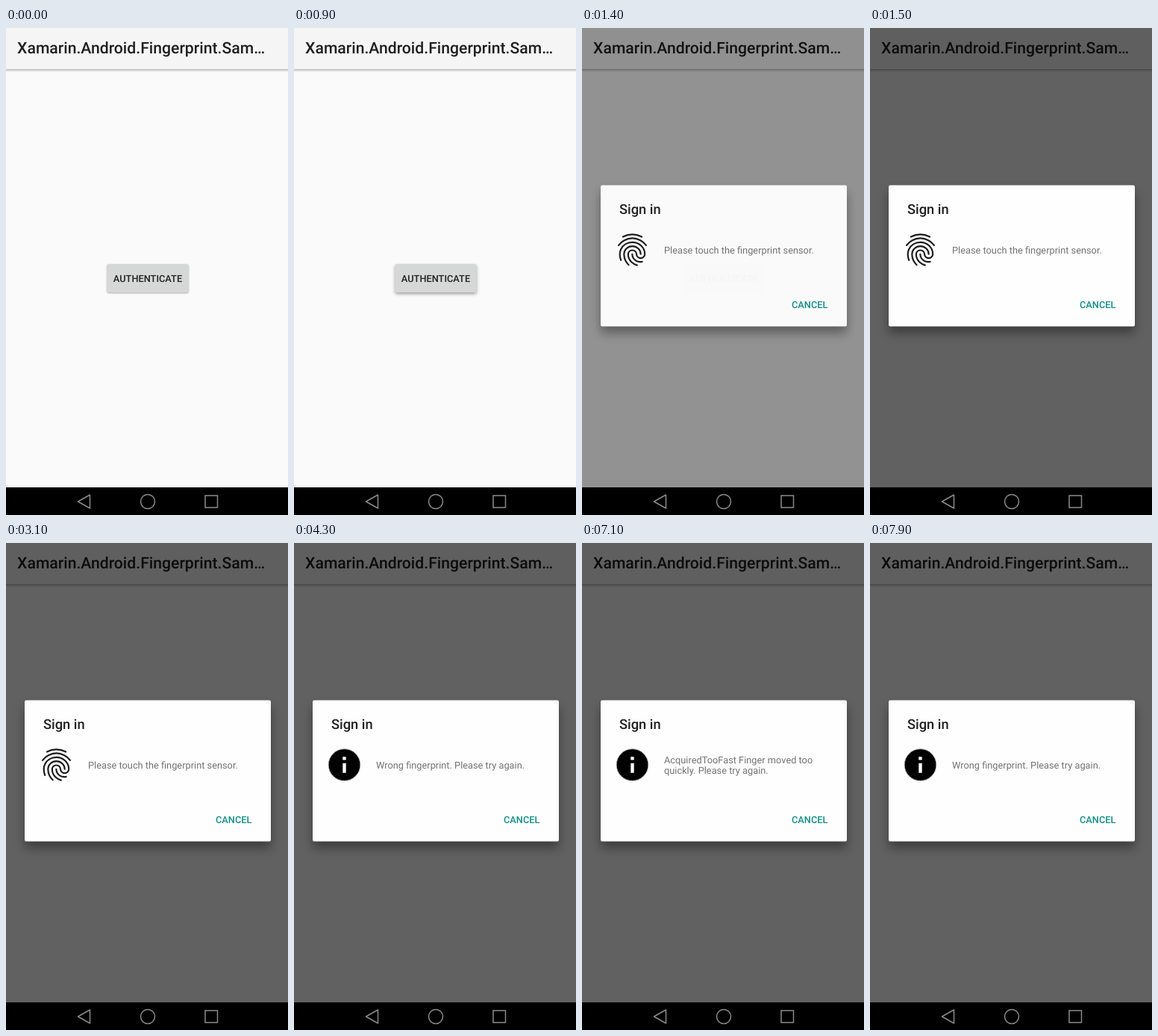
Animation of 378x652 px, one loop 8000 ms. Source, as an HTML page:

```html
<!DOCTYPE html>
<html lang="en">
<head>
<meta charset="utf-8">
<title>Fingerprint sign-in</title>
<style>
  html, body { margin: 0; width: 100%; height: 100%; overflow: hidden; background: #fafafa; }
  svg { display: block; width: 100%; height: 100%; }
  text { font-family: Roboto, "Open Sans", sans-serif; font-size: 12.8px; text-rendering: geometricPrecision; }
  .medium { font-weight: 500; }
  .line { fill: none; stroke: #8a8a8a; stroke-width: 1.5; }
  #card { filter: drop-shadow(0 9px 7px rgba(0, 0, 0, .36)); }
  #print { fill: none; stroke: #1c1c1c; stroke-width: 1; stroke-linecap: round; }
</style>
</head>
<body>
<svg viewBox="0 0 378 652" xmlns="http://www.w3.org/2000/svg">
  <defs>
    <linearGradient id="edge" x1="0" y1="0" x2="0" y2="1">
      <stop offset="0" stop-color="#000" stop-opacity=".26"/>
      <stop offset="1" stop-color="#000" stop-opacity="0"/>
    </linearGradient>
  </defs>

  <rect width="378" height="652" fill="#fafafa"/>
  <rect width="378" height="55" fill="#f5f5f5"/>
  <rect y="55" width="378" height="4" fill="url(#edge)"/>
  <text class="medium" x="15" y="33.5" style="font-size:21.2px" fill="#1f1f1f">Xamarin.Android.Fingerprint.Sam…</text>
  <rect id="dim" width="378" height="615" fill="#000"/>

  <g id="dialog">
    <rect id="card" x="25" y="210.5" width="330" height="189" rx="2" fill="#fefefe"/>
    <text class="medium" x="50" y="249" style="font-size:18.3px" fill="#212121">Sign in</text>
    <g id="print" transform="translate(67.5 297) scale(2.17) translate(-12 -12)">
      <path d="M6.2 3.97C8 3 10 2.5 12 2.5S15.8 2.95 17.8 3.97"/>
      <path d="M3.5 9.2C4.4 7.9 5.6 6.85 7.1 6.1C10.1 4.55 13.9 4.55 16.9 6.1C18.4 6.85 19.55 7.9 20.5 9.2"/>
      <path d="M9.75 21.29C8.95 20.48 8.5 20 7.83 18.76C7.2 17.6 6.84 16.2 6.84 14.66C6.84 11.97 9.15 9.77 12 9.77S17.16 11.97 17.16 14.66"/>
      <path d="M11.94 14.66C11.94 16.24 12.74 17.71 14.1 18.63C15 19.24 16.2 19.6 18.05 19.33"/>
      <path d="M14.91 21.5C13.4 21.08 12.44 20.54 11.41 19.52C10.11 18.22 9.39 16.5 9.39 14.66C9.39 13.31 10.54 12.22 11.97 12.22S14.55 13.31 14.55 14.66S15.7 17.1 17.13 17.1S19.71 16.01 19.71 14.66C19.71 10.61 16.24 7.33 11.96 7.33C8.93 7.33 6.16 9.03 4.91 11.65C4.1 13.4 4.05 15.9 4.95 18.44"/>
    </g>
    <g id="info">
      <circle cx="67.5" cy="297" r="21.3" fill="#000" stroke="#aaa" stroke-width=".8"/>
      <path d="M65.3 286.2h4.4v4.4h-4.4zM65.3 294.8h4.4v13h-4.4z" fill="#fff"/>
    </g>
    <g fill="#737373">
      <text id="first" x="110"></text>
      <text id="second" x="110" y="309.3"></text>
    </g>
    <text class="medium" x="281" y="374.5" fill="#0d9085">CANCEL</text>
  </g>

  <g id="button">
    <rect id="face" x="135.5" y="316" width="109" height="38" rx="2" fill="#d6d7d7"/>
    <text class="medium" x="190" y="340" text-anchor="middle" fill="#212121">AUTHENTICATE</text>
  </g>

  <rect y="615" width="378" height="37" fill="#000"/>
  <path class="line" stroke-linejoin="round" d="M112.5 625v18L96.5 634z"/>
  <circle class="line" cx="190" cy="634" r="9.5"/>
  <rect class="line" x="267" y="626" width="16.5" height="16"/>
</svg>
<script>
const LOOP = 8000;
const $ = id => document.getElementById(id);

const PROMPT = ["Please touch the fingerprint sensor."];
const WRONG = ["Wrong fingerprint. Please try again."];
const TOO_FAST = ["AcquiredTooFast Finger moved too", "quickly. Please try again."];

// Each row holds from its start time until the next one.
const looks = [
  { at: 0, dialog: 0, dim: 0, button: 1 },
  { at: 1300, dialog: .22, dim: .004, button: .93 },
  { at: 1400, dialog: .97, dim: .415, button: .015 },
  { at: 1500, dialog: 1, dim: .61, button: 0 }
];
const messages = [
  { at: 0, lines: PROMPT },
  { at: 4300, lines: WRONG },
  { at: 4500, lines: TOO_FAST },
  { at: 7800, lines: WRONG }
];

const current = (rows, t) => rows.filter(row => row.at <= t).pop();
const show = (id, alpha) => $(id).setAttribute("opacity", alpha);

function draw(t) {
  const look = current(looks, t);
  for (const id of ["dialog", "dim", "button"]) show(id, look[id]);

  const { lines } = current(messages, t);
  show("print", lines === PROMPT ? 1 : 0);
  show("info", lines === PROMPT ? 0 : 1);
  $("first").textContent = lines[0];
  $("first").setAttribute("y", lines.length > 1 ? 294.5 : 302);
  $("second").textContent = lines[1] || "";

  // Pressing lifts the button.
  $("face").style.filter = t < 900
    ? "drop-shadow(0 1px 1px rgba(0,0,0,.32))"
    : "drop-shadow(0 2.5px 2px rgba(0,0,0,.38))";
}

const start = performance.now();
function tick() {
  draw((performance.now() - start) % LOOP);
  requestAnimationFrame(tick);
}
tick();
</script>
</body>
</html>
```
